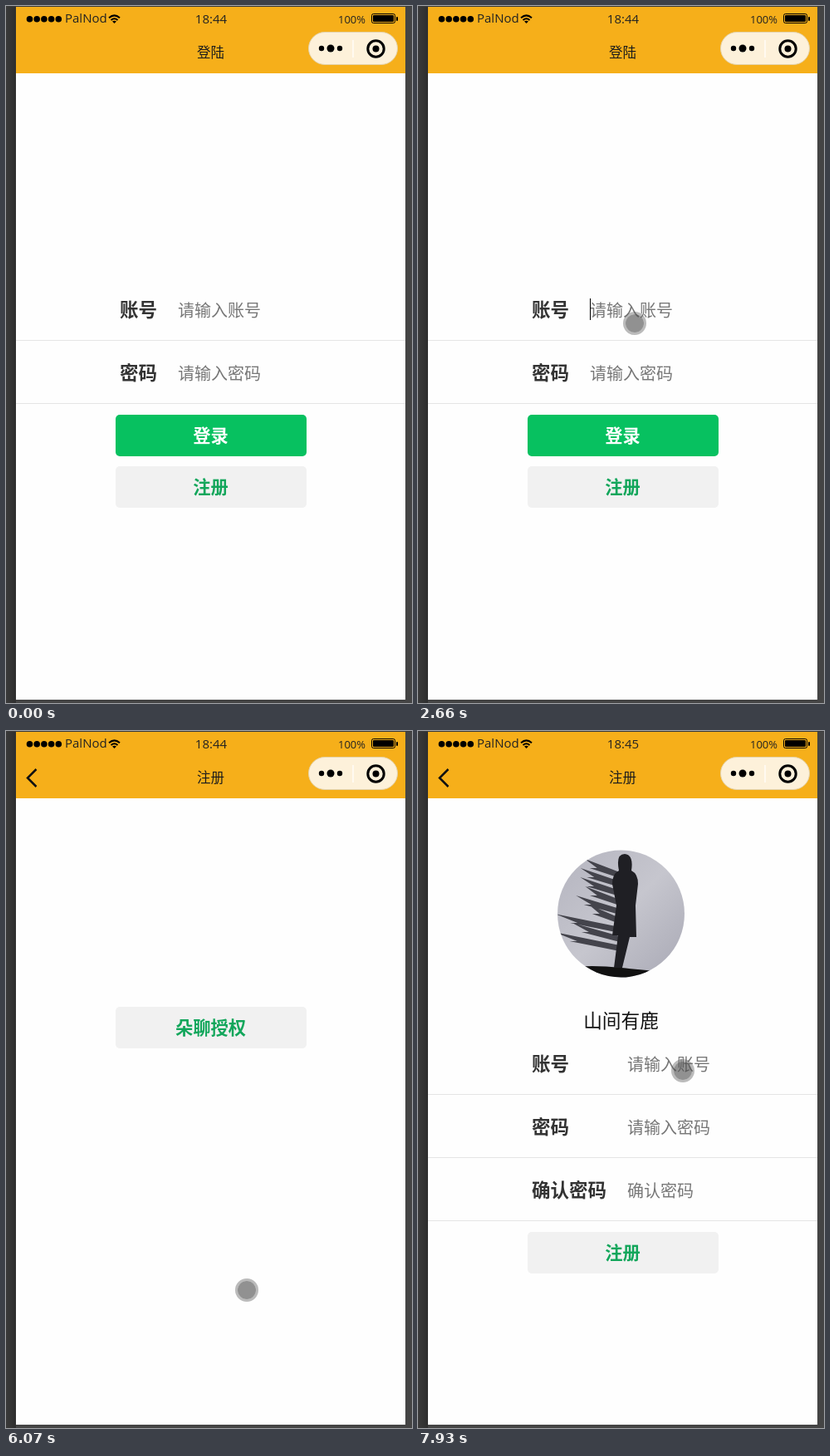
An HTML page that plays this animation: 489 by 839 pixels, repeating every 8 s.

```html
<!DOCTYPE html>
<html lang="zh-CN">
<head>
<meta charset="utf-8">
<title>登陆</title>
<style>
html, body { margin: 0; width: 100%; height: 100%; overflow: hidden; background: #333; }
svg { display: block; width: 489px; height: 839px; }
text { font-family: "Noto Sans CJK SC", "Noto Sans CJK", "Noto Sans CJK JP", sans-serif; }
.latin { font-family: "Open Sans", "Noto Sans", sans-serif; fill: #222; }
</style>
</head>
<body>
<svg viewBox="0 0 489 839">
  <defs>
    <linearGradient id="edge"><stop stop-color="#3a3a3a"/><stop offset="1" stop-color="#2e2e2e"/></linearGradient>
    <linearGradient id="sky" x2="1" y2="1"><stop stop-color="#b4b4bf"/><stop offset=".5" stop-color="#c6c6ce"/><stop offset="1" stop-color="#a8a8b4"/></linearGradient>
    <clipPath id="round"><circle cx="244.5" cy="220" r="76.5"/></clipPath>
    <clipPath id="screen"><path d="M12 1H481V835H12z"/></clipPath>
  </defs>
  <rect width="489" height="839" fill="#444"/>
  <rect width="12" height="839" fill="url(#edge)"/>
  <rect width="489" height="1" fill="#3a3a3a"/>
  <g clip-path="url(#screen)">
    <rect x="12" y="1" width="469" height="834" fill="#fefefe"/>
    <g id="login"></g>
    <g id="auth"></g>
    <g id="form"></g>

    <rect x="12" y="1" width="469" height="80" fill="#f6af1a"/>
    <path d="M28.500 15.800H64" stroke="#000" stroke-width="7.600" stroke-linecap="round" stroke-dasharray="0 8.700"/>
    <text class="latin" x="71" y="20" font-size="15">PalNod</text>
    <g fill="none" stroke="#000" stroke-width="2">
      <path d="M124 14.200Q130.500 8.600 137 14.200M126.500 17Q130.500 13.600 134.500 17"/>
      <path d="M128 18.600Q130.500 17 133 18.600L130.500 21z" fill="#000" stroke="none"/>
    </g>
    <text id="clock" class="latin" x="247" y="21" font-size="15" text-anchor="middle"></text>
    <text class="latin" x="400" y="21" font-size="13">100%</text>
    <rect x="440.500" y="9.500" width="28" height="11" rx="2" fill="none" stroke="#000"/>
    <rect x="442" y="11" width="25" height="8" rx="1"/>
    <rect x="470" y="13" width="2" height="5" rx="1"/>
    <text id="title" x="246.500" y="62" font-size="16.500" text-anchor="middle" fill="#1c1c1c"></text>
    <path id="back" d="M36.500 46L26 56.500L36.500 67" fill="none" stroke="#111" stroke-width="2.500"/>

    <rect x="364.500" y="31.500" width="107" height="39" rx="19.500" fill="#fdf1da" stroke="#e4d3aa"/>
    <path d="M418 41V62" stroke="#fffaf0" stroke-width="2"/>
    <circle cx="380" cy="51" r="3.200"/><circle cx="391" cy="51" r="4.500"/><circle cx="402" cy="51" r="3.200"/>
    <circle cx="445.500" cy="51.500" r="9.700" fill="none" stroke="#000" stroke-width="3"/>
    <circle cx="445.500" cy="51.500" r="4"/>

    <g id="sheet">
      <rect x="12" y="26" width="469" height="809" opacity=".5"/>
      <rect id="panel" x="12" y="545" width="469" height="310" rx="12" fill="#fff"/>
    </g>
    <g id="touch">
      <circle r="12.500" fill="none" stroke="#606060" stroke-opacity=".42" stroke-width="3"/>
      <circle r="11" fill="#505050" fill-opacity=".63"/>
    </g>
    <path id="hand" transform="translate(308 770)" fill="#fff" stroke="#232" stroke-linejoin="round"
      d="M5.500 15V3Q5.500 1 7.200 1T9 3V10V7.500Q12 6.500 12.300 9V11V8.500Q15 7.500 15.300 10V12V10Q18 9.500 18 12V17Q18 21 16 23Q14.500 25 12 25H10Q7 25 5 22L1 16.500Q0 14.500 1.500 13.500Q3 13 5.500 16z"/>
  </g>
</svg>
<script>
const $ = id => document.getElementById(id);
const GREEN = '#12a65b', GREY = '#f1f1f1', PRESSED = '#dedede';

// Text placed by its vertical centre
const label = (x, y, size, color, str, extra = '') =>
  `<text x="${x}" y="${y + size * 0.375}" font-size="${size}" fill="${color}" ${extra}>${str}</text>`;

const button = (y, str, fill = GREY, color = GREEN) =>
  `<rect class="button" x="132" y="${y}" width="230" height="50" rx="5" fill="${fill}"/>` +
  label(246.5, y + 25.5, 21.3, color, str, 'text-anchor="middle" font-weight="700"');

// Rows of a form, each closed by a hairline
const fields = (y, x, rows) => rows.map(([name, hint], i) => {
  const cy = y + i * 76;
  return label(137, cy, 22.5, '#333', name, 'font-weight="700"') +
    label(x, cy, 20, '#777', hint) +
    `<rect x="12" y="${cy + 36}" width="469" height="1" fill="#e5e5e5"/>`;
}).join('');

// Ragged wisps blown left from the figure
const wisps = Array.from({ length: 9 }, (_, i) => {
  const y = 170 + i * 11, reach = 35 + 22 * Math.sin(i * 1.7 + 0.6) ** 2 + (i > 5 ? 22 : 0);
  return `M243 ${y}L${243 - reach} ${y - 16}l${reach * 0.35} 11l-9 0L243 ${y + 7}z`;
}).join('');

const page = '<rect x="12" y="81" width="469" height="754" fill="#fefefe"/>';
const rows = [['账号', '请输入账号'], ['密码', '请输入密码']];

$('login').innerHTML = fields(366, 207, rows) +
  button(492, '登录', '#07c160', '#fff') + `<g id="join">${button(554, '注册')}</g>` +
  '<rect id="caret" x="207" y="352" width="1" height="26"/>';

$('auth').innerHTML = page + button(332, '朵聊授权');

$('form').innerHTML = page +
  `<g id="avatar" clip-path="url(#round)">
    <path d="M168 143H322V297H168z" fill="url(#sky)"/>
    <path d="M168 287Q200 280 245 285T322 291V297H168z" fill="#111"/>
    <path d="${wisps}" fill="#44444c"/>
    <path d="M242 168Q238 148 249 148Q260 149 257 168Q265 172 265 184L262 210L263 248H255L246 285H236L241 246H234L239 210L234 184Q234 172 242 168z" fill="#1f1f24"/>
  </g>` +
  label(244.5, 348, 22.7, '#111', '山间有鹿', 'text-anchor="middle" font-weight="350"') +
  fields(401, 252, [...rows, ['确认密码', '确认密码']]) + button(603, '注册');

// Pointer moves: start, end, path; it rests in between
const moves = [
  [460, 1240, 'M446 805C405 700 376 560 400 437Q392 365 270 359'],
  [1310, 1900, 'M270 359Q270 400 261 440'],
  [2320, 2660, 'M261 440V382'],
  [3060, 3200, 'M261 382L266 380'],
  [3790, 3930, 'M266 380L377 466'],
  [4000, 4420, 'M377 466Q390 520 295 585'],
  [4910, 5110, 'M295 585L275 357'],
  [5580, 6070, 'M275 357L290 673'],
  [6140, 6360, 'M290 673L317 783'],
  [7440, 7930, 'M317 783L319 409']
].map(([from, to, d]) => {
  const path = document.createElementNS('http://www.w3.org/2000/svg', 'path');
  path.setAttribute('d', d);
  return { from, to, path, length: path.getTotalLength() };
});

const clamp = v => Math.max(0, Math.min(1, v));
const ramp = (t, from, to) => clamp((t - from) / (to - from));
const within = (t, from, to) => t >= from && t < to;
const show = (id, on) => $(id).setAttribute('visibility', on ? 'visible' : 'hidden');
const press = (id, on) => document.querySelector(`#${id} .button`).setAttribute('fill', on ? PRESSED : GREY);

function pointer(t) {
  const move = moves.findLast(m => t >= m.from) || moves[0];
  const { x, y } = move.path.getPointAtLength(move.length * ramp(t, move.from, move.to));
  return `translate(${x} ${y})`;
}

function draw(t) {
  const pushed = t >= 4540;
  const left = (1 - ramp(t, 4540, 4840)) ** 2;
  $('auth').setAttribute('transform', `translate(${469 * left} 0)`);
  show('auth', pushed);
  show('form', t >= 7170);
  show('avatar', t >= 7240);
  show('back', pushed);
  $('title').textContent = pushed ? '注册' : '登陆';
  $('clock').textContent = t < 6290 ? '18:44' : '18:45';

  show('caret', within(t, 1450, 4160) && (t - 1450) % 1090 < 545);
  press('join', within(t, 4420, 4560));
  press('auth', within(t, 5190, 5380));

  const open = ramp(t, 6210, 6360) * (1 - ramp(t, 6700, 6840));
  $('sheet').setAttribute('opacity', open);
  $('panel').setAttribute('transform', `translate(0 ${290 * (1 - open)})`);

  const pointing = within(t, 6360, 7440);
  show('hand', pointing);
  show('touch', t >= 460 && !pointing && !within(t, 4840, 5110));
  $('touch').setAttribute('transform', pointer(t));
}

const start = performance.now();
(function tick() {
  draw((performance.now() - start) % 8000);
  requestAnimationFrame(tick);
})();
</script>
</body>
</html>
```
